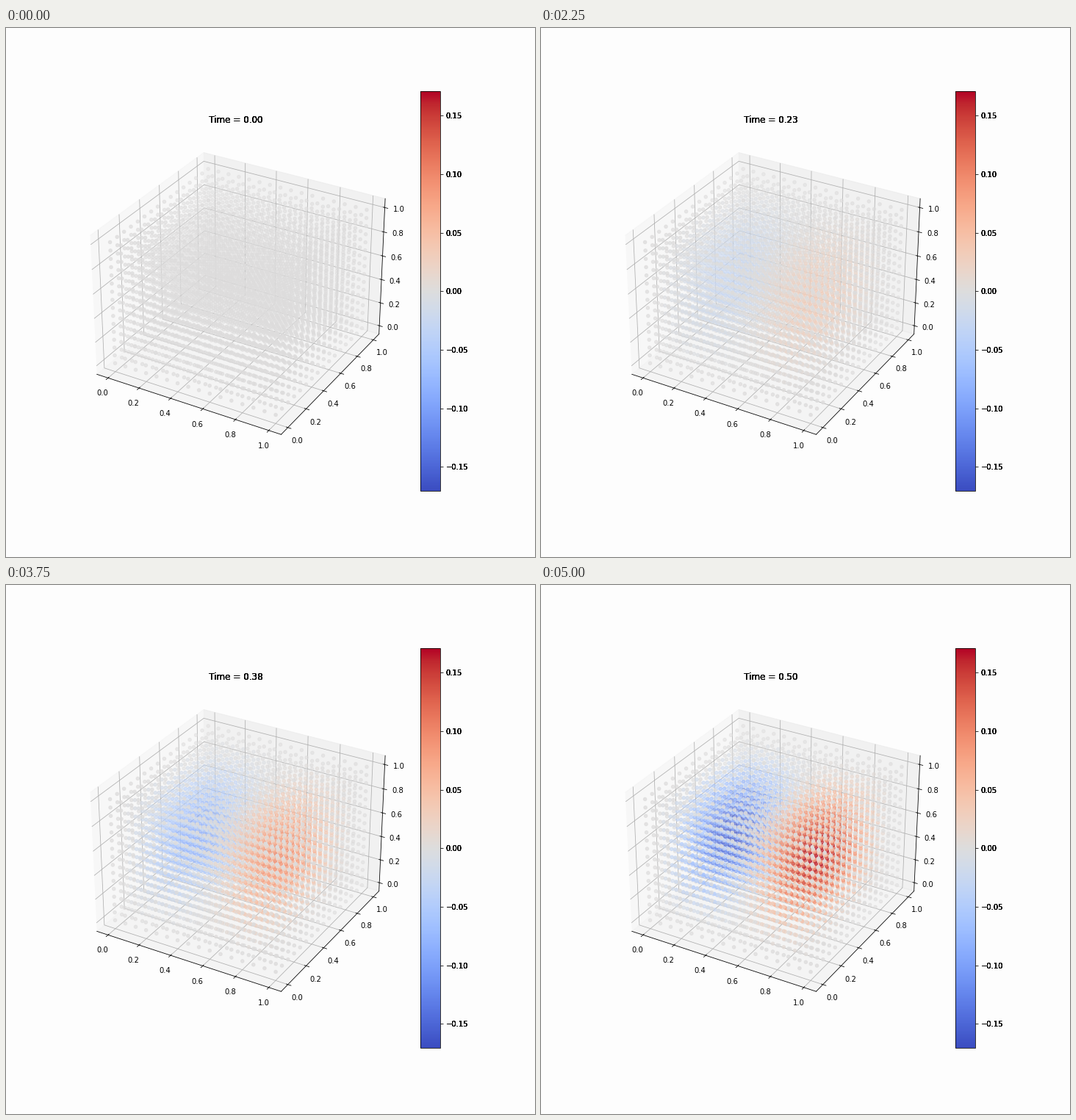
A matplotlib script that plays this animation: 720x720 px, repeating every 5250 ms.

```python
import numpy as np
import matplotlib.pyplot as plt
from matplotlib.animation import FuncAnimation
from matplotlib.colors import Normalize

SIZE, DPI = 720, 72
FRAMES, INTERVAL = 21, 250
DT, T_END = 0.025, 0.5
PEAK = 0.1706
PAPER = "#fdfdfd"

plt.rcParams.update({
    "font.family": "DejaVu Sans",
    "font.size": 10,
    "figure.facecolor": PAPER,
    "savefig.facecolor": PAPER,
    "axes.facecolor": PAPER,
})

# Standing wave sampled on a regular lattice of the unit cube
s = np.linspace(0, 1, 16)
x, y, z = (a.ravel() for a in np.meshgrid(s, s, s, indexing="ij"))
mode = -np.sin(2 * np.pi * x) * np.sin(np.pi * y) * np.sin(np.pi * z)
mode /= mode.max()


def wave(t):
    return PEAK * (t / T_END) ** 2 * mode


fig = plt.figure(figsize=(SIZE / DPI, SIZE / DPI), dpi=DPI)
fig.subplots_adjust(left=0.125, right=0.9, bottom=0.125, top=0.88)
ax = fig.add_subplot(111, projection="3d")
points = ax.scatter(x, y, z, c=wave(0), cmap="coolwarm",
                    norm=Normalize(-PEAK, PEAK))

pad = 0.05 + 1.1 / 48
lim = (-pad, 1 + pad)
ax.set(xlim=lim, ylim=lim, zlim=lim)

bar = fig.colorbar(points, ax=ax)

# Labels are laid down more than once, which makes them look heavier
for v in np.arange(-3, 4) * 0.05:
    label = f"{v:.2f}".replace("-", "\u2212")
    for _ in range(4):
        bar.ax.annotate(label, (1, v), xycoords=bar.ax.get_yaxis_transform(),
                        xytext=(7, 0), textcoords="offset points",
                        ha="left", va="center_baseline",
                        annotation_clip=False)
titles = [fig.text(313.2 / SIZE, 591 / SIZE, "", size=12,
                   ha="center", va="baseline") for _ in range(5)]


def update(i):
    t = i * DT
    points.set_array(wave(t))
    for title in titles:
        title.set_text(f"Time = {t:.2f}")
    return [points, *titles]


anim = FuncAnimation(fig, update, frames=FRAMES, interval=INTERVAL,
                     repeat=True, repeat_delay=0, blit=False)
plt.show()
```
